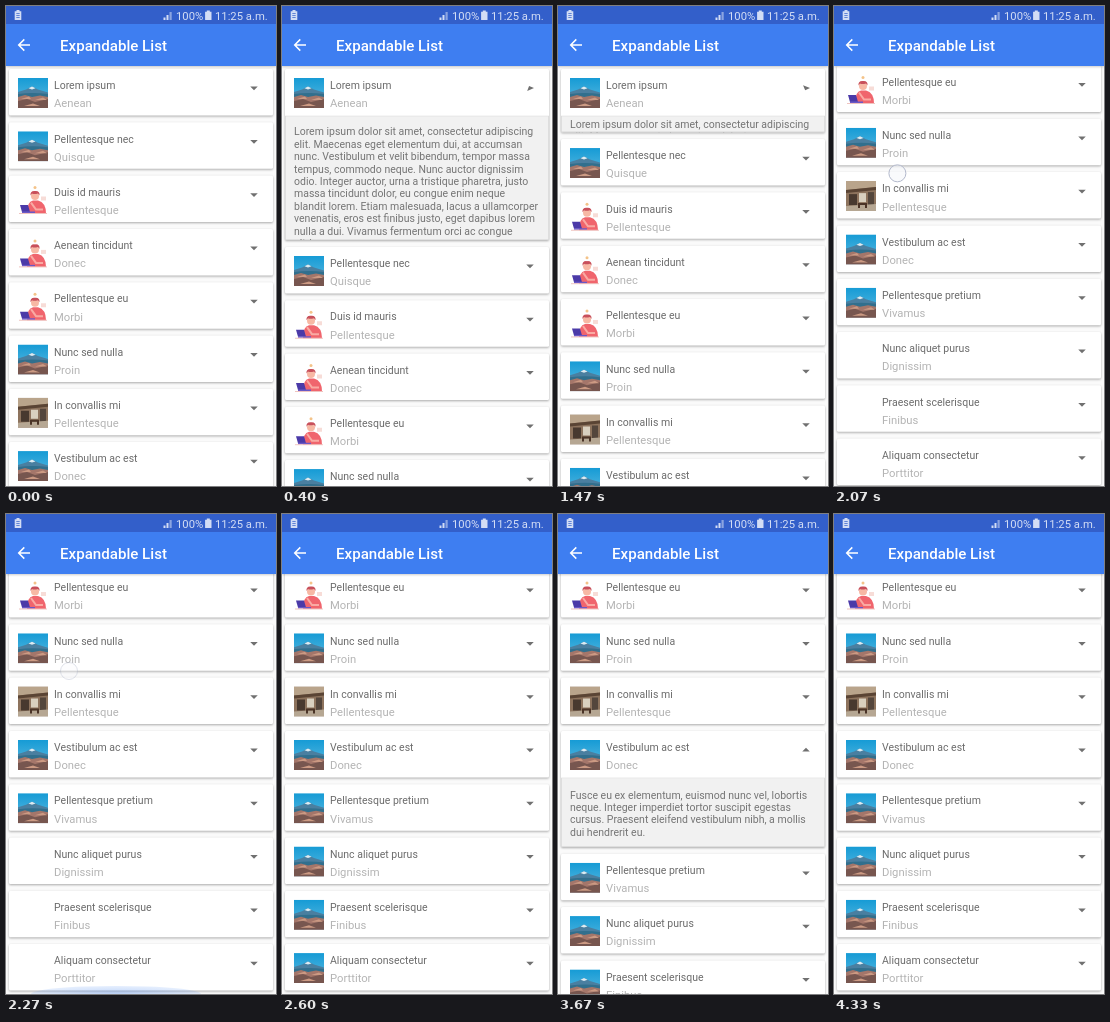
An HTML page for the animation above (4.39 s loop, 270 by 480 pixels).

```html
<!DOCTYPE html>
<html lang="la">
<head>
<meta charset="utf-8">
<title>Expandable List</title>
<style>
html, body { margin: 0; width: 100%; height: 100%; overflow: hidden; background: #fafafa; }
svg { display: block; }
#stage { width: 100vw; height: 100vh; font-family: Roboto, "Noto Sans", sans-serif; }
.card { fill: #fff; filter: drop-shadow(0 1px 1px rgba(0,0,0,.32)); }
.title { font-size: 10.5px; fill: #6c6c6c; }
.sub { font-size: 11.25px; fill: #b4b4b4; }
.body { font-size: 10.5px; fill: #757575; }
.status { font-size: 11.25px; fill: #d3ddf5; }
.head { font-size: 15.1px; font-weight: 500; fill: #fff; }
</style>
</head>
<body>
<svg id="stage" viewBox="0 0 270 480" preserveAspectRatio="none">
  <defs>
    <linearGradient id="sky" x2="0" y2="1">
      <stop offset="0" stop-color="#169bd5"/><stop offset="1" stop-color="#63bde2"/>
    </linearGradient>
    <symbol id="view" viewBox="0 0 30 30">
      <rect width="30" height="30" fill="url(#sky)"/>
      <path d="M0 14L8 11.500 14 8.500 20 11.500 30 14.500V19H0z" fill="#4a7fa0"/>
      <path d="M10.500 10.300L14 8.500 17.500 10.300 14 11.500z" fill="#dcebf2"/>
      <path d="M0 16Q15 14 30 16V22H0z" fill="#316f8d"/>
      <path d="M0 19L7 17 14 19 22 17.500 30 19V30H0z" fill="#a4766a"/>
      <path d="M0 23L9 21 17 24 30 21V30H0z" fill="#77564f"/>
      <path d="M3 21L11 18.500 13 21zM17 22L25 19.500 29 22zM6 28L15 25.500 22 28z" fill="#cc9a83"/>
    </symbol>
    <symbol id="desk" viewBox="0 0 30 30">
      <rect width="30" height="30" fill="#fff"/>
      <circle cx="17" cy="3" r="1.500" fill="#f4c389"/>
      <path d="M23 12h5v4h-5z" fill="#f7dcd7"/>
      <path d="M9 29Q9 17 15 16L20 16Q28 18 28 29z" fill="#f0656d"/>
      <path d="M13 18L18 25 25 25" fill="none" stroke="#f9aaa3" stroke-width="2"/>
      <circle cx="17" cy="11.500" r="4" fill="#f7b8a4"/>
      <path d="M12.500 11Q12 6 17 6.500 22 6 21.500 11L20 9Q16 10 14 9z" fill="#c8505b"/>
      <path d="M2 20.500h8l2 7H4z" fill="#4b3aa8"/>
      <path d="M4 27h13v1.500H4z" fill="#6a58c6"/>
      <path d="M1 28.500h28v1H1z" fill="#efc3bf"/>
    </symbol>
    <symbol id="shop" viewBox="0 0 30 30">
      <rect width="30" height="30" fill="#8d735d"/>
      <path d="M0 0h30v6L0 9z" fill="#b9a48b"/>
      <path d="M0 9L30 6V9L0 12z" fill="#5a4434"/>
      <path d="M3 13h8v11H3z" fill="#48392f"/>
      <path d="M13 12h7v9h-7z" fill="#d9d0bf"/>
      <path d="M22 11h6v14h-6z" fill="#54463c"/>
      <path d="M0 25L30 23V30H0z" fill="#b6a793"/>
      <path d="M12 22h9v5h-2v-3h-5v3h-2z" fill="#4b3427"/>
    </symbol>
    <radialGradient id="glow">
      <stop offset="0" stop-color="#4285f4" stop-opacity=".4"/>
      <stop offset="1" stop-color="#4285f4" stop-opacity=".16"/>
    </radialGradient>
  </defs>
  <rect width="270" height="480" fill="#fafafa"/>
  <g id="list"></g>
  <ellipse id="edge" cx="110" cy="480" rx="85" ry="8" fill="url(#glow)"/>
  <rect y="18" width="270" height="42" fill="#3e7ef1" style="filter:drop-shadow(0 1px 1px rgba(0,0,0,.2))"/>
  <rect width="270" height="18" fill="#335fca"/>
  <g fill="#d3ddf5">
    <path d="M10.500 4h3v1.200h1.800V14H8.700V5.200h1.800z"/>
    <path d="M200.800 4.500h3v1.200h1.700V14h-6.400V5.700h1.700z"/>
    <path d="M163.500 6h2.200v8h-2.200z" opacity=".55"/>
    <path d="M160.500 9h2v5h-2zM157.500 11.500h2V14h-2z"/>
  </g>
  <path d="M10.300 7.500h3.400M10.300 9.500h3.400M10.300 11.500h3.400" stroke="#335fca" stroke-width=".7"/>
  <text class="status" x="170" y="13.500">100%</text>
  <text class="status" x="209" y="13.500">11:25 a.m.</text>
  <path d="M24 39H13M18.300 33.400L12.700 39 18.300 44.600" fill="none" stroke="#fff" stroke-width="1.500"/>
  <text class="head" x="54" y="44.800">Expandable List</text>
  <circle id="touch" r="8.500" fill="#f4f5fa" fill-opacity=".55" stroke="#b3b9cc" stroke-width="1"/>
</svg>
<script>
const LOOP = 4390, PITCH = 53.3, HEAD = 46.5, LINE = 12.4, SCROLL = 219.2;
const rows = [
  ["Lorem ipsum", "Aenean", "view"],
  ["Pellentesque nec", "Quisque", "view"],
  ["Duis id mauris", "Pellentesque", "desk"],
  ["Aenean tincidunt", "Donec", "desk"],
  ["Pellentesque eu", "Morbi", "desk"],
  ["Nunc sed nulla", "Proin", "view"],
  ["In convallis mi", "Pellentesque", "shop"],
  ["Vestibulum ac est", "Donec", "view"],
  ["Pellentesque pretium", "Vivamus", "view"],
  ["Nunc aliquet purus", "Dignissim", "view"],
  ["Praesent scelerisque", "Finibus", "view"],
  ["Aliquam consectetur", "Porttitor", "view"]
];
const bodies = {
  0: ["Lorem ipsum dolor sit amet, consectetur adipiscing",
    "elit. Maecenas eget elementum dui, at accumsan",
    "nunc. Vestibulum et velit bibendum, tempor massa",
    "tempus, commodo neque. Nunc auctor dignissim",
    "odio. Integer auctor, urna a tristique pharetra, justo",
    "massa tincidunt dolor, eu congue enim neque",
    "blandit lorem. Etiam malesuada, lacus a ullamcorper",
    "venenatis, eros est finibus justo, eget dapibus lorem",
    "nulla a dui. Vivamus fermentum orci ac congue",
    "ultrices."],
  7: ["Fusce eu ex elementum, euismod nunc vel, lobortis",
    "neque. Integer imperdiet tortor suscipit egestas",
    "cursus. Praesent eleifend vestibulum nibh, a mollis",
    "dui hendrerit eu."]
};
// row: [open start, close start]
const toggles = { 0: [225, 1288], 7: [3200, 3955] };
const TOGGLE_MS = 300, IMAGES_AT = 2400;
// [on, off, x, y]
const taps = [
  [80, 250, 249, 88], [1080, 1300, 249, 88],
  [2990, 3220, 249, 240], [3810, 3980, 249, 240]
];
const swipe = { on: 1680, off: 2300, from: 1730, to: 2190, y0: 392, y1: 157 };

const $ = id => document.getElementById(id);
function el(tag, attrs, parent, text) {
  const node = document.createElementNS("http://www.w3.org/2000/svg", tag);
  for (const k in attrs) node.setAttribute(k, attrs[k]);
  if (text) node.textContent = text;
  parent.appendChild(node);
  return node;
}
const clamp = (v, a = 0, b = 1) => Math.min(b, Math.max(a, v));
const span = (t, a, b) => clamp((t - a) / (b - a));

// cubic-bezier(.4, 0, .2, 1)
function ease(x) {
  let lo = 0, hi = 1, u = x;
  for (let i = 0; i < 20; i++) {
    u = (lo + hi) / 2;
    const v = 1 - u;
    if (1.2 * v * v * u + 0.6 * v * u * u + u * u * u < x) lo = u; else hi = u;
  }
  return x <= 0 ? 0 : x >= 1 ? 1 : 3 * (1 - u) * u * u + u * u * u;
}

const items = rows.map(([title, sub, pic], i) => {
  const g = el("g", {}, $("list")), lines = bodies[i];
  const item = { g, full: 0 };
  item.card = el("rect", { class: "card", x: 3, width: 264, height: HEAD, rx: 1.5 }, g);
  if (lines) {
    item.full = lines.length * LINE + 20;
    item.panel = el("svg", { x: 3, y: HEAD, width: 264, height: 0 }, g);
    item.fill = el("rect", { x: .4, y: .4, width: 263.2, fill: "#f1f1f1", stroke: "#d9d9d9", "stroke-width": .8 }, item.panel);
    item.text = el("g", {}, item.panel);
    lines.forEach((s, n) => el("text", { class: "body", x: 9, y: 21.2 + n * LINE }, item.text, s));
  }
  item.pic = el("use", { href: "#" + pic, x: 12, y: 9, width: 30, height: 30 }, g);
  el("text", { class: "title", x: 48, y: 20.3 }, g, title);
  el("text", { class: "sub", x: 48, y: 38.4 }, g, sub);
  item.arrow = el("path", { d: "M-3.75 -1.5h7.5L0 2.25z", fill: "#707070" }, g);
  return item;
});

function openness(i, t) {
  if (!toggles[i]) return 0;
  const [a, b] = toggles[i];
  return ease(span(t, a, a + TOGGLE_MS)) - ease(span(t, b, b + TOGGLE_MS));
}

const fade = (t, on, off) => Math.min(span(t, on, on + 60), 1 - span(t, off - 70, off));

function drawTouch(t) {
  const k = ease(span(t, swipe.from, swipe.to));
  let x = 72 - 9 * k, y = swipe.y0 + (swipe.y1 - swipe.y0) * k;
  let alpha = fade(t, swipe.on, swipe.off);
  for (const [on, off, tx, ty] of taps) {
    if (t >= on && t <= off) { x = tx; y = ty; alpha = fade(t, on, off); }
  }
  $("touch").setAttribute("transform", `translate(${x} ${y})`);
  $("touch").setAttribute("opacity", alpha);
}

function draw(t) {
  const moved = (swipe.y0 - swipe.y1) * ease(span(t, swipe.from, swipe.to));
  let y = 63 - clamp(moved - 8, 0, SCROLL);
  items.forEach((item, i) => {
    const p = openness(i, t), h = item.full * p;
    item.g.setAttribute("transform", `translate(0 ${y})`);
    item.card.setAttribute("height", HEAD + h);
    item.arrow.setAttribute("transform", `translate(248 19.1) rotate(${180 * p})`);
    if (item.panel) {
      item.panel.setAttribute("visibility", h > 0 ? "visible" : "hidden");
      item.panel.setAttribute("height", h);
      item.fill.setAttribute("height", Math.max(0, h - .8));
      item.text.setAttribute("transform", `translate(0 ${-10 * (1 - p)})`);
    }
    if (i > 8) item.pic.setAttribute("visibility", t < IMAGES_AT ? "hidden" : "visible");
    y += PITCH + h;
  });
  $("edge").setAttribute("opacity", Math.min(span(t, 2090, 2190), 1 - span(t, 2230, 2480)));
  drawTouch(t);
}

const start = performance.now();
function tick() {
  draw((performance.now() - start) % LOOP);
  requestAnimationFrame(tick);
}
tick();
</script>
</body>
</html>
```
